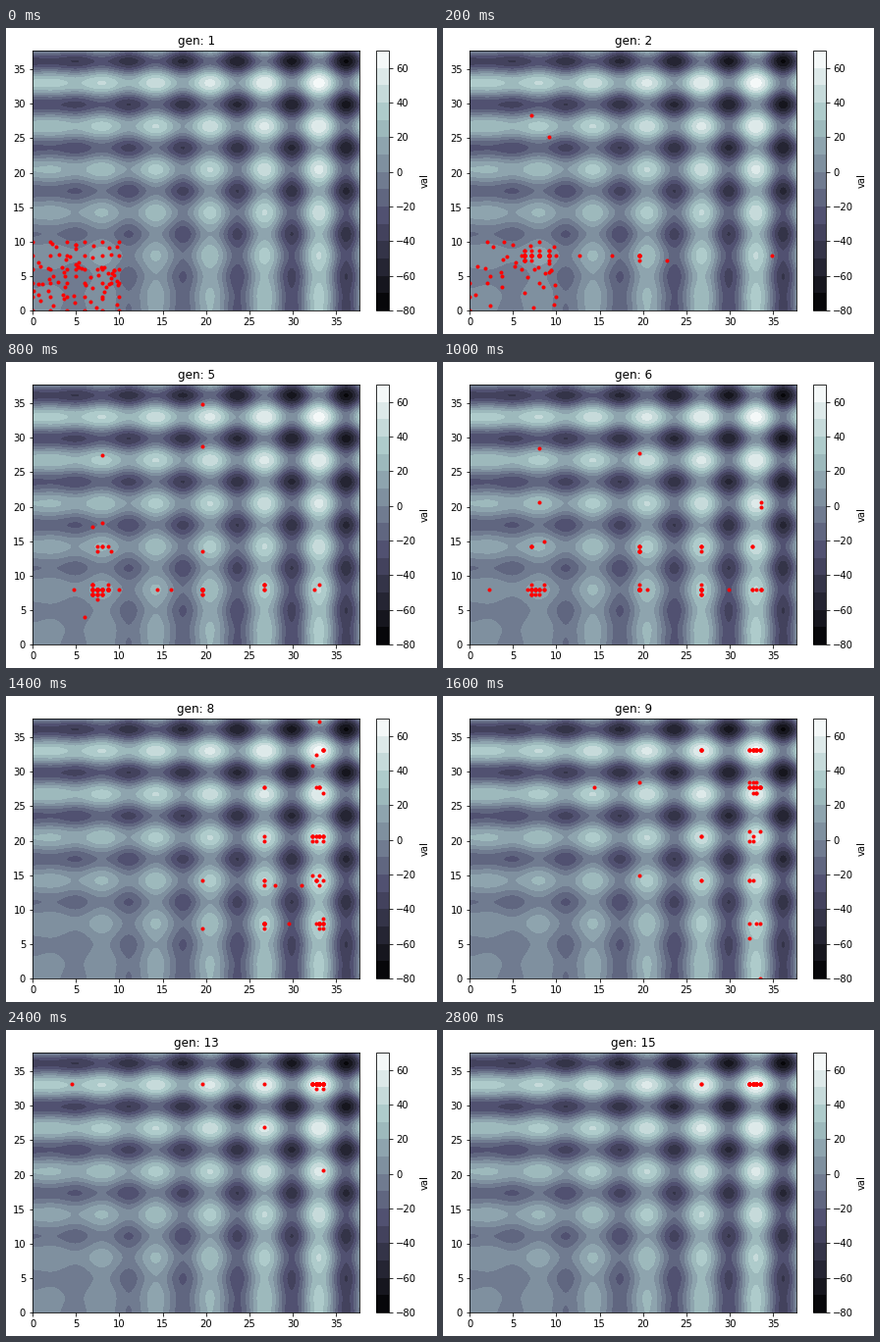
Animation of 439 by 312 pixels, one loop 3000 ms. Source, as a matplotlib script:

```python
import itertools

import matplotlib.pyplot as plt
import numpy as np
from matplotlib.animation import FuncAnimation

W, H, DPI = 439, 312, 72
GENS, STEP_MS = 15, 200
END = 12 * np.pi

# Hills the population climbs, lowest first
X_PEAKS = np.array([8, 19.6, 26.7, 33])
Y_PEAKS = np.array([8, 14.3, 20.7, 27.7, 33.2])
X_STEPS = [-0.7, -0.35, 0, 0.5]
Y_STEPS = [-0.8, 0, 0.7]


def founders():
    """An even 6 by 6 lattice plus loose points in the lower left corner."""
    rng = np.random.default_rng(4)
    lattice = np.array(list(itertools.product(range(0, 11, 2), repeat=2)))
    return np.vstack([lattice, rng.uniform(0, 10, (64, 2))])


def pick_peaks(rng, peaks, drive, n):
    """Choose hills; a negative drive favours the low ones, a positive the high."""
    weight = np.exp(drive * np.arange(len(peaks)))
    return rng.choice(len(peaks), n, p=weight / weight.sum())


def population(gen):
    rng = np.random.default_rng(gen)
    left = np.sqrt((GENS - gen) / (GENS - 1))
    n = 105 - 5 * gen
    reach = max(1, 3 - 0.3 * gen)

    # x settles on the highest hill sooner than y
    kx = pick_peaks(rng, X_PEAKS, 2.8 * np.tanh((gen - 6.4) / 3), n)
    ky = pick_peaks(rng, Y_PEAKS, 0.65 * (gen - 8.5), n)
    outer = (kx == 0) | (kx == len(X_PEAKS) - 1)
    side = 0.25 * left
    x = X_PEAKS[kx] + outer * reach * rng.choice(X_STEPS, n)
    y = Y_PEAKS[ky] + rng.choice(Y_STEPS, n, p=[side, 1 - 1.5 * side, side / 2])
    y = np.minimum(y, Y_PEAKS[-1])

    # mutation changes one coordinate
    luck = rng.random(n)
    rate = 0.06 * left
    x = np.where(luck < rate, rng.uniform(0, END, n), x)
    y = np.where(luck > 1 - rate, rng.uniform(0, END, n), y)

    # founders die out quickly
    kept = int(n * 0.4 ** (gen - 1))
    first = rng.permutation(founders())[:kept]
    return np.vstack([first, np.column_stack([x, y])[kept:]])


def box(x0, y0, x1, y1):
    """Axes rectangle from pixel edges measured from the top left."""
    return [x0 / W, 1 - y1 / H, (x1 - x0) / W, (y1 - y0) / H]


plt.rcParams.update({"font.family": "DejaVu Sans", "font.size": 10})
fig = plt.figure(figsize=(W / DPI, H / DPI), dpi=DPI, facecolor="white")
ax = fig.add_axes(box(27.1, 23.1, 360.1, 288.1))
cax = fig.add_axes(box(377.1, 23.1, 390.2, 288.1))

t = np.linspace(0, END, 378)
X, Y = np.meshgrid(t, t)
field = ax.contourf(X, Y, X * np.sin(X) + Y * np.sin(Y),
                    levels=np.arange(-80, 71, 10), cmap="bone")
fig.colorbar(field, cax=cax, label="val")
dots, = ax.plot([], [], "r.", markersize=6)
title = ax.set_title("gen: 1", fontsize=12)
ax.set(xlim=(0, END), ylim=(0, END))


def draw(i):
    gen = i + 1
    dots.set_data(*population(gen).T)
    title.set_text(f"gen: {gen}")
    return dots, title


anim = FuncAnimation(fig, draw, frames=GENS, init_func=lambda: draw(0),
                     interval=STEP_MS, repeat=True, repeat_delay=0)
plt.show()
```
